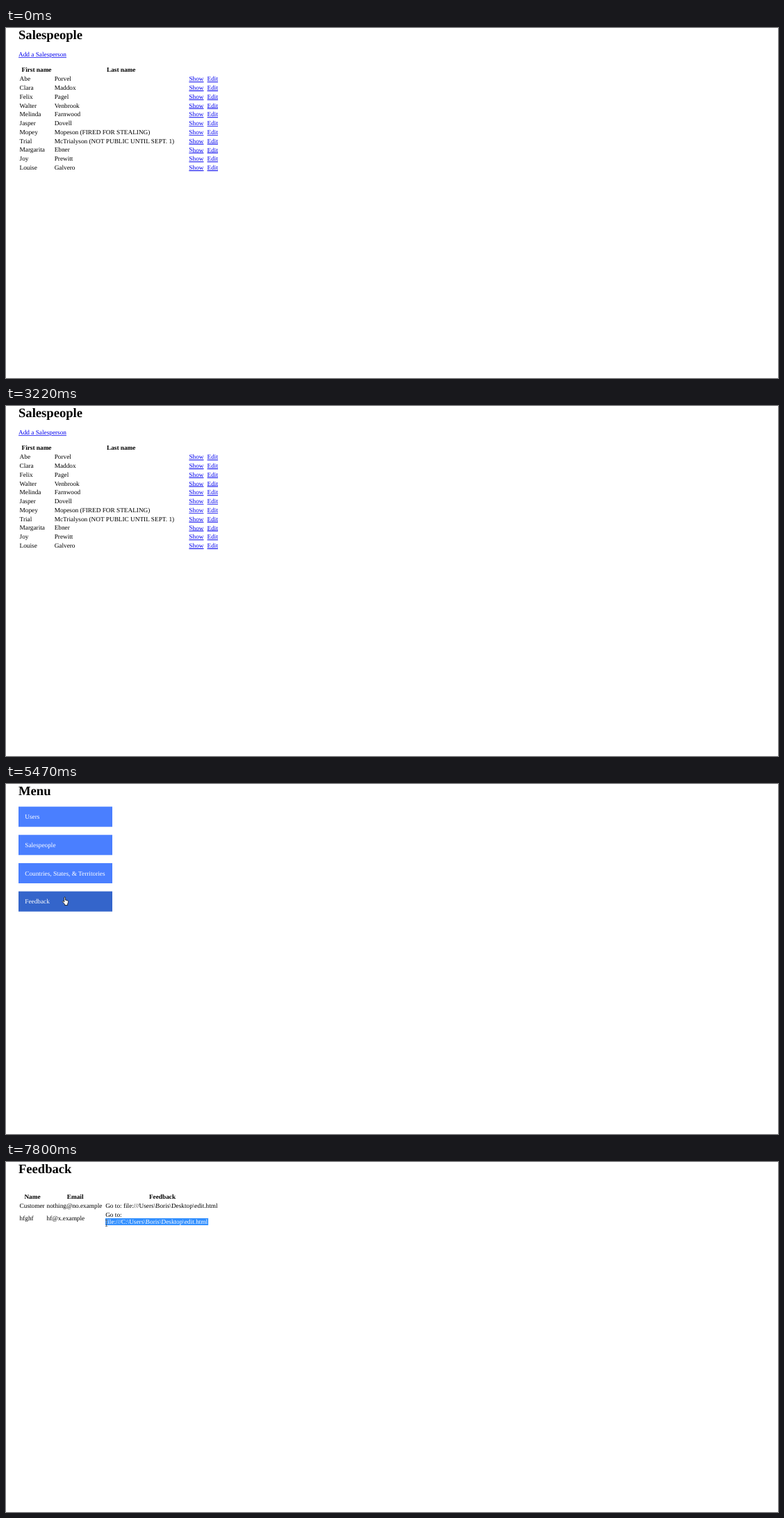
Recreate the animation shown at these times as an HTML page. Size 1111x504 px, loop 8000 ms.

```html
<!DOCTYPE html>
<html lang="en">
<head>
<meta charset="utf-8">
<title>Admin pages</title>
<style>
  html, body { margin: 0; width: 100%; height: 100%; overflow: hidden; background: #fff; }
  svg { display: block; width: 1111px; height: 504px; }
  /* The tiny turn keeps baselines from snapping to whole pixels. */
  text { font: 9.28px "Liberation Serif", "Times New Roman", serif; text-rendering: geometricPrecision; transform: rotate(.01deg); }
  .title { font-size: 18.6px; font-weight: bold; }
  .head { font-weight: bold; text-anchor: middle; }
  .link { fill: #00e; text-decoration: underline; text-decoration-thickness: .58px; }
  .white { fill: #fff; }
  #pointers path { stroke-linejoin: round; }
</style>
</head>
<body>
<svg viewBox="0 0 1111 504">
  <defs><clipPath id="selected"><rect id="range" x="291" y="80.8" width="0" height="10.4"/></clipPath></defs>
  <g id="salespeople"></g>
  <g id="menu"></g>
  <g id="feedback"></g>
  <g id="selection" clip-path="url(#selected)">
    <rect x="143" y="80.8" width="148.3" height="10.4" fill="#3390ff"/>
  </g>
  <g id="pointers">
    <g id="arrow"><path transform="translate(.5 .5) scale(.59)" d="M0 0V16L3.8 12.5L6.4 18.5L9 17.4L6.5 11.5H11.5Z" fill="#fff" stroke="#223" stroke-width="1.2"/></g>
    <g id="hand"><path transform="translate(-4 -.6) scale(.58)" d="M5.5 2C5.5 .5 8.5 .5 8.5 2V8L14 9.5C15.5 10 16 11 15.5 13.5L14 18V21H7V18.5L1.5 12.5C1 10.5 3 10 4 11L5.5 13Z" fill="#fff" stroke="#000" stroke-width="1.3"/></g>
    <g id="beam"><path d="M.8 .5H4.2M2.5 .5V9.5M.8 9.5H4.2" fill="none" stroke="#333" stroke-width=".58"/></g>
  </g>
</svg>
<script>
const LOOP = 8000, SCALE = 0.581, ROW = 22 * SCALE;
const $ = id => document.getElementById(id);

function add(parent, tag, attrs, content = '') {
  const el = document.createElementNS(parent.namespaceURI, tag);
  for (const key in attrs) el.setAttribute(key, attrs[key]);
  el.textContent = content;
  return parent.appendChild(el);
}
const write = (page, x, y, content, style = '') =>
  add($(page), 'text', { x, y, class: style }, content);

// Salespeople page
const people = [
  ['Abe', 'Porvel'], ['Clara', 'Maddox'], ['Felix', 'Pagel'], ['Walter', 'Venbrook'],
  ['Melinda', 'Farnwood'], ['Jasper', 'Dovell'], ['Mopey', 'Mopeson (FIRED FOR STEALING)'],
  ['Trial', 'McTrialyson (NOT PUBLIC UNTIL SEPT. 1)'], ['Margarita', 'Ebner'],
  ['Joy', 'Prewitt'], ['Louise', 'Galvero']
];
write('salespeople', 18, 15.6, 'Salespeople', 'title');
write('salespeople', 18, 40.9, 'Add a Salesperson', 'link');
write('salespeople', 44, 63.4, 'First name', 'head');
write('salespeople', 165.7, 63.4, 'Last name', 'head');
people.forEach(([first, last], i) => {
  const y = 76.2 + ROW * i;
  write('salespeople', 19.6, y, first);
  write('salespeople', 69.7, y, last);
  write('salespeople', 263.4, y, 'Show', 'link');
  write('salespeople', 289.6, y, 'Edit', 'link');
});

// Menu page
write('menu', 18, 15.6, 'Menu', 'title');
const buttons = ['Users', 'Salespeople', 'Countries, States, & Territories', 'Feedback'].map((label, i) => {
  const top = 32.6 + 70 * SCALE * i;
  const box = add($('menu'), 'rect', { x: 18, y: top, width: 135, height: 50 * SCALE });
  write('menu', 27.3, top + 17.6, label, 'white');
  return { box, top };
});

// Feedback page
const path = 'file:///C:\\Users\\Boris\\Desktop\\edit.html';
write('feedback', 18, 15.6, 'Feedback', 'title');
write('feedback', 38, 53.1, 'Name', 'head');
write('feedback', 99.7, 53.1, 'Email', 'head');
write('feedback', 225, 53.1, 'Feedback', 'head');
write('feedback', 19.6, 65.9, 'Customer');
write('feedback', 58.6, 65.9, 'nothing@no.example');
write('feedback', 143.2, 65.9, 'Go to: file:///Users\\Boris\\Desktop\\edit.html');
write('feedback', 19.6, 83.9, 'hfghf');
write('feedback', 58.6, 83.9, 'hf@x.example');
write('feedback', 143.2, 78.7, 'Go to:');
write('feedback', 143.2, 89.1, path);
write('selection', 143.2, 89.1, path, 'white');

// Pointer moves: start, end, number of steps, points along the way
const linear = p => p, easeOut = p => 1 - (1 - p) ** 2, smooth = p => p * p * (3 - 2 * p);
const moves = [
  { from: 160, to: 720, steps: 7, ease: easeOut, points: [[1036, 446], [282, 90]] },
  { from: 900, to: 1640, steps: 9, points: [[270, 105], [215, 135], [140, 100], [99, 35], [129, 88]] },
  { from: 1740, to: 2388, steps: 8, points: [[150, 95], [200, 140], [130, 197], [19, 150], [55, 85], [118, 36]] },
  { from: 2480, to: 2480, steps: 1, points: [] },
  { from: 3040, to: 3040, steps: 1, points: [[126, 0]] },
  { from: 3220, to: 3220, steps: 1, points: [] },
  { from: 4910, to: 5290, steps: 5, points: [[172, 1], [146, 45], [120, 92], [98, 138], [84.5, 163]] },
  { from: 5850, to: 6590, steps: 9, points: [[84.5, 161], [87, 148], [150, 125], [245, 100], [298, 87]] },
  { from: 6690, to: 6690, steps: 1, points: [[306, 88]] },
  { from: 6960, to: 7700, steps: 9, ease: smooth, points: [[300, 87], [142.5, 83]] },
  { from: 7800, to: 7800, steps: 1, points: [[142, 83]] }
];

function pointerAt(t) {
  const move = moves.filter(m => t >= m.from).pop();
  if (!move || !move.points.length) return null;
  const { from, to, steps, points, ease = linear } = move;
  if (points.length === 1) return points[0];
  const gap = (to - from) / (steps - 1);
  const step = Math.min(steps - 1, Math.floor((t - from) / gap + 0.01));
  const along = ease(step / (steps - 1)) * (points.length - 1);
  const i = Math.min(points.length - 2, Math.floor(along));
  return points[i].map((v, axis) => v + (points[i + 1][axis] - v) * (along - i));
}

const show = (id, on) => $(id).style.display = on ? '' : 'none';

function render(t) {
  const page = t < 4350 ? 'salespeople' : t < 5850 ? 'menu' : 'feedback';
  ['salespeople', 'menu', 'feedback'].forEach(id => show(id, id === page));

  const at = pointerAt(t);
  const hovered = page === 'menu' && at && at[0] < 153
    ? buttons.find(b => at[1] >= b.top && at[1] <= b.top + 50 * SCALE) : null;
  const shade = t < 5470 ? '#3d70e2' : '#3465cb';
  buttons.forEach(b => b.box.setAttribute('fill', b === hovered ? shade : '#4a7fff'));

  const kind = !at ? '' : hovered ? 'hand' : t >= 6590 ? 'beam' : 'arrow';
  ['arrow', 'hand', 'beam'].forEach(id => show(id, id === kind));
  if (kind) $(kind).setAttribute('transform', `translate(${at})`);

  const dragging = t >= 6960;
  show('selection', dragging);
  if (dragging) {
    const left = Math.min(291.3, at[0] < 145 ? 143 : at[0] + 2.5);
    $('range').setAttribute('x', left);
    $('range').setAttribute('width', 291.3 - left);
  }
}

const start = performance.now();
function tick() {
  render((performance.now() - start) % LOOP);
  requestAnimationFrame(tick);
}
tick();
</script>
</body>
</html>
```
